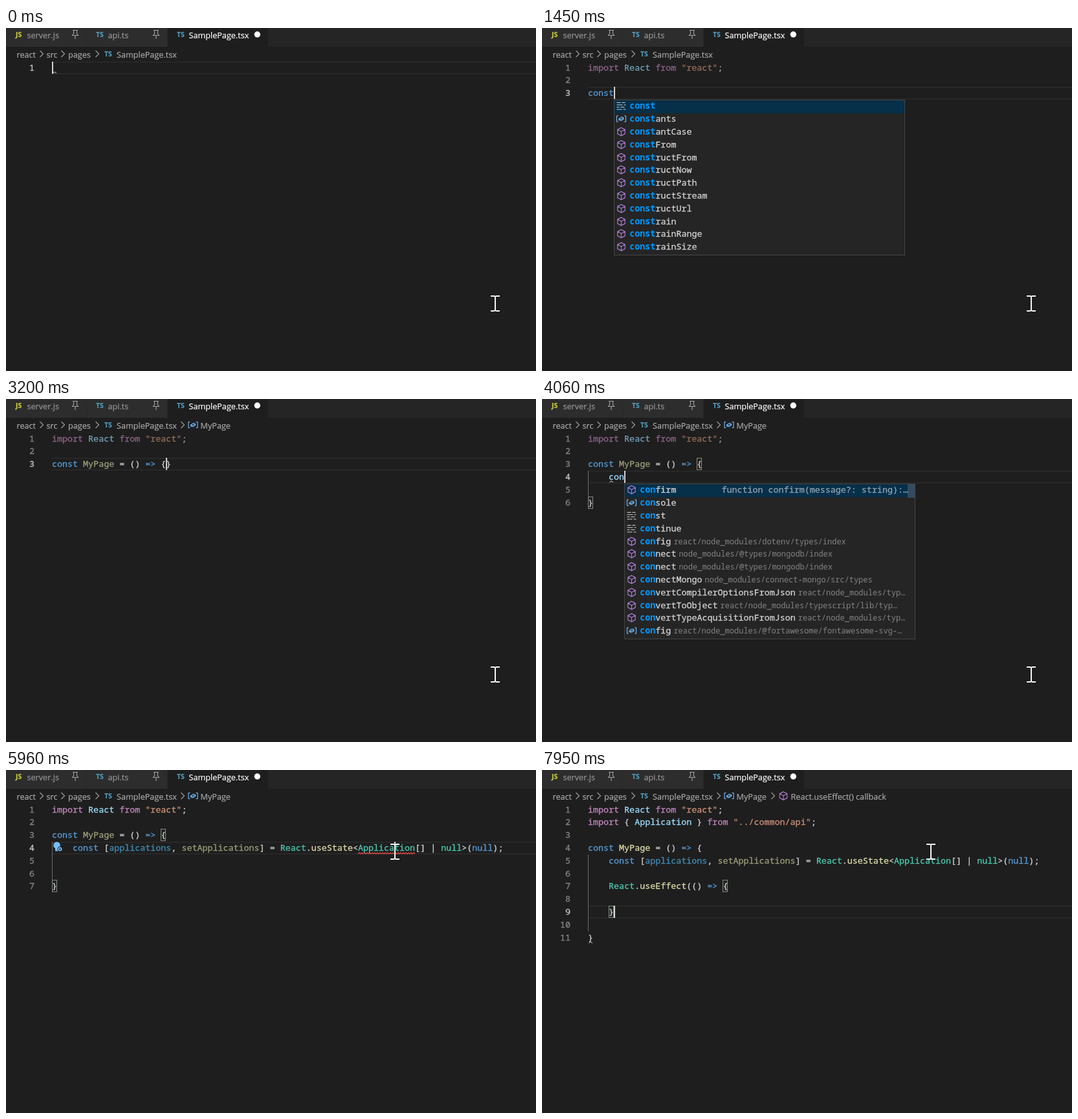
Animation of 819x531 px, one loop 8000 ms. Source, as an HTML page:

```html
<!DOCTYPE html>
<html lang="en">
<head>
<meta charset="utf-8">
<title>Editor typing</title>
<style>
html, body { margin: 0; width: 100%; height: 100%; overflow: hidden; background: #1e1e1e; }
svg { display: block; }
text { white-space: pre; stroke-width: .2; }
.code { font: 13.36px "Noto Sans Mono", "DejaVu Sans Mono", monospace; font-variant-ligatures: none; stroke-width: .3; }
.path { font-size: 12px; stroke-width: .1; }
.hit { font-weight: 700; stroke-width: 0; }
.ui { font: 12.65px "Open Sans", "Noto Sans", sans-serif; }
.lang { font: 700 10.5px "Open Sans", "Noto Sans", sans-serif; }
.line { fill: none; stroke-width: 1.1; }
</style>
</head>
<body>
<svg id="stage" width="819" height="531" viewBox="0 0 819 531">
  <g id="frame"></g>
  <g id="editor"></g>
  <path id="mouse" class="line" stroke="#f4f4f4" style="stroke-width:2"
    d="M-7-11.5h5.5l1.5 1 1.5-1H7M0-11V11M-7 11.5h5.5l1.5-1 1.5 1H7"/>
</svg>
<script>
const LOOP = 8000, X = 71, CW = 8.016, TOP = 52, LH = 19.8;
const $ = id => document.getElementById(id);
const colX = c => X + c * CW;
const rowY = r => Math.floor(TOP + r * LH);
const esc = s => s.replace(/&/g, '&amp;').replace(/</g, '&lt;');

// ---- drawing helpers ----
const text = (x, y, s, fill, cls = 'code', more = '') =>
  `<text class="${cls}" x="${x.toFixed(2)}" y="${y}" fill="${fill}" stroke="${fill}" ${more}>${esc(s)}</text>`;
const rect = (x, y, w, h, fill, more = '') =>
  `<rect x="${x}" y="${y}" width="${w}" height="${h}" fill="${fill}" ${more}/>`;
const path = (x, y, d, stroke) =>
  `<path class="line" transform="translate(${x} ${y})" stroke="${stroke}" d="${d}"/>`;

const ICONS = {
  m: ['#b180d7', 'M0-6.3L5.7-3.3V3.3L0 6.3-5.7 3.3V-3.3ZM-5.7-3.3L0-.3 5.7-3.3M0-.3V6.3'],
  v: ['#75beff', 'M-4.5-4.5H-7v9h2.5M4.5-4.5H7v9H4.5M-3.5 .2L.5-2.6 3.5-1.4V.6L-.5 3-3.5 1.8ZM-3.5 .2L-.5 1.2 3.5-1.4'],
  c: ['#ee9d28', 'M-6.5-2.5l3.5-3.5 2.5 2.5L-4 0ZM-2.5-1H3M0-1V4.5H3M3-1l1.8-1.8L6.6-1 4.8 .8ZM3 4.5l1.8-1.8 1.8 1.8-1.8 1.8Z'],
  k: ['#d4d4d4', 'M-7-5h6M1-5h5M-7-1.5h9M4-1.5h3M-7 2h4M-1 2h6M-7 5.5h8M3 5.5h4'],
  d: ['#d4d4d4', 'M-5-6.5H5V6.5H-5ZM-5-3.5h4M-5-.3h4M-5 3h4'],
  s: ['#d4d4d4', 'M-6.5 6V-6H6.5V6M-6.5 6h2M-3 6h2M.5 6h2M4 6h2']
};
const icon = (k, x, y) => path(x, y, ICONS[k][1], ICONS[k][0]);
const chevron = x => path(x, 40, 'M-2.5-5l5 5-5 5', '#a0a0a0');

// ---- suggestion lists: kind, label, optional path ----
const parse = s => s.trim().split('\n').map(l => {
  const [kind, label, where] = l.trim().split('|');
  return { kind, label, where };
});
const group = (kind, words) => words.split(' ').map(label => ({ kind, label }));
const NM = 'react/node_modules/';
const LISTS = {
  i: [...group('k', 'if import implements in infer instanceof interface is'),
    ...group('v', 'indexedDB innerHeight innerWidth'), ...group('m', 'isFinite isNaN')],
  imp: parse(`d|import React from "react";
    d|import React from 'react';
    d|import React, { useContext } from "react";
    d|import ReactDOM from 'react-dom';`),
  con: parse(`m|confirm
    v|console
    k|const
    k|continue
    m|config|${NM}dotenv/types/index
    m|connect|node_modules/@types/mongodb/index
    m|connect|node_modules/@types/mongodb/index
    m|connectMongo|node_modules/connect-mongo/src/types
    m|convertCompilerOptionsFromJson|${NM}typ…
    m|convertToObject|${NM}typescript/lib/typ…
    m|convertTypeAcquisitionFromJson|${NM}typ…
    v|config|${NM}@fortawesome/fontawesome-svg-…`),
  const: [...group('k', 'const'), ...group('v', 'constants'),
    ...group('m', 'constantCase constFrom constructFrom constructNow constructPath constructStream constructUrl constrain constrainRange constrainSize')],
  eq: parse('s|foreach =>'),
  M: group('v', 'Map Math MediaError MediaList MediaSource MediaStream MessageChannel MessageEvent MessagePort MimeType MouseEvent MutationObserver'),
  R: group('v', 'React ReactDOM Readonly ReadableStream Range RangeError Record Reflect RegExp Request Response ReturnType'),
  dot: [{ kind: 'd', label: 'React.useEffect(() => {' },
    ...group('v', 'Children'), ...group('c', 'Component'), ...group('v', 'Fragment Profiler'),
    ...group('c', 'PureComponent'), ...group('v', 'StrictMode Suspense'),
    ...group('m', 'cloneElement createContext createElement createFactory createRef forwardRef isValidElement lazy memo useCallback useContext useDebugValue useEffect useImperativeHandle useLayoutEffect useMemo useReducer useRef useState'),
    ...group('v', 'version')]
};
const DETAIL = {
  confirm: ['function confirm(message?: string):…', 11],
  'foreach =>': ['For-Each Loop using =>', 12]
};

// ---- edits over time ----
const insert = (s, str, pop = null, move = str.length) => {
  const l = s.lines[s.row];
  s.lines[s.row] = l.slice(0, s.col) + str + l.slice(s.col);
  s.col += move;
  s.pop = pop;
};
const goto = (s, row, col = s.lines[row].length) => Object.assign(s, { row, col });
const setLine = (s, str) => { s.lines[s.row] = str; s.col = str.length; s.pop = null; };
const enter = s => {
  const l = s.lines[s.row], rest = l.slice(s.col);
  const indent = s.row > 1 ? '    ' : '';
  s.lines[s.row] = l.slice(0, s.col);
  s.lines.splice(s.row + 1, 0, ...(rest === '}' ? [indent, rest] : [indent + rest]));
  goto(s, s.row + 1, indent.length);
};
const keys = (t, str, pop) => [...str].map((c, i) => [t + i * 80, s => insert(s, c, pop)]);
const set = (t, props) => [t, s => Object.assign(s, props)];

const STEPS = [
  ...keys(70, 'import', 'i'), ...keys(550, ' Re', 'imp'),
  [810, s => { setLine(s, 'import React from "react";'); s.hint = null; }],
  [880, enter], [960, enter], set(1040, { dim: true }),
  ...keys(1120, 'con', 'con'), ...keys(1360, 'st', 'const'),
  ...keys(1520, ' '), ...keys(1600, 'M', 'M'), set(1680, { pop: null }),
  ...keys(1760, 'yPage '), ...keys(2260, '=', 'eq'), ...keys(2340, ' '),
  [2420, s => insert(s, '()', null, 1)], [2480, s => s.col++], ...keys(2560, ' '),
  ...keys(2640, '=>', 'eq'), ...keys(2880, ' '),
  [2960, s => insert(s, '{}', null, 1)], set(3120, { fn: true, crumb: 1 }),
  [3510, s => { enter(s); s.match = 'MyPage'; }],
  [3590, enter], [3670, s => goto(s, 3)],
  set(3900, { hint: [3, 4] }), ...keys(3900, 'con', 'con'), ...keys(4160, 'st', 'const'),
  [4320, s => { insert(s, ' '); s.hint = null; }],
  [4480, s => insert(s, '[applications, setApplications] = React.useState<Application[] | null>(null);')],
  set(4640, { dim: false }), set(4960, { error: true }),
  [5130, enter], [5720, s => goto(s, 3, 66)], set(5880, { bulb: true }),
  [6120, s => {
    s.lines.splice(1, 0, 'import { Application } from "../common/api";');
    s.row++;
    s.error = s.bulb = false;
  }],
  [6360, s => goto(s, 5)], [6440, enter],
  ...keys(6750, 'React', 'R'), ...keys(7150, '.use', 'dot'),
  [7470, s => { setLine(s, '    React.useEffect(() => {'); s.match = 'useEffect'; }],
  [7630, enter], [7710, enter], [7790, s => setLine(s, '    }')],
  set(7870, { crumb: 2, live: true }), set(7950, { hint: [10, 0] })
];
const start = () => ({ lines: [''], row: 0, col: 0, pop: null, hint: 'caret', crumb: 0 });

// ---- syntax colours ----
const KEY = { import: '#c586c0', from: '#c586c0', const: '#569cd6', '=>': '#569cd6',
  useState: '#dcdcaa', useEffect: '#dcdcaa' };
function style(tok, line, next, s) {
  const imported = line.startsWith('import');
  if (tok[0] === '"') return ['#ce9178'];
  if (tok === 'MyPage') return s.fn ? ['#dcdcaa', s.live ? 1 : .67] : ['#4fc1ff'];
  if (tok === 'applications') return ['#4fc1ff', .67];
  if (tok === 'setApplications') return ['#dcdcaa', .67];
  if (tok === 'React' && next === '.' || tok === 'Application' && !imported) return ['#4ec9b0'];
  if (tok === 'null') return [next === '>' ? '#4ec9b0' : '#569cd6'];
  return [KEY[tok] || (/\w/.test(tok) ? '#9cdcfe' : '#d4d4d4')];
}
function codeLine(line, r, s) {
  return [...line.matchAll(/"[^"]*"|[A-Za-z]+|=>|[^\s]/g)].map(m => {
    const [fill, alpha = 1] = style(m[0], line, line[m.index + m[0].length], s);
    const a = r === 0 && s.dim ? .67 : alpha;
    return text(colX(m.index), rowY(r) + 14, m[0], fill, 'code', `opacity="${a}"`);
  }).join('');
}

function popup(s) {
  const before = s.lines[s.row].slice(0, s.col).trim();
  const word = before.match(/\w*$/)[0];
  const hitLen = l => l.startsWith(before) ? before.length : l.startsWith(word) ? word.length : 0;
  const items = LISTS[s.pop].filter(i => !word || hitLen(i.label));
  const n = Math.min(12, items.length);
  if (!n) return '';
  const x = Math.floor(colX(s.col)), y = rowY(s.row + 1);
  const h = Math.round(n * LH + 3.6);
  let out = rect(0, 0, 450, h, '#252526') + rect(1, 1, 448, Math.min(20, h - 2), '#062f4a');
  items.slice(0, 13).forEach(({ kind, label, where }, i) => {
    const base = Math.round(14.3 + i * LH), len = hitLen(label);
    out += icon(kind, 11.5, base - 4.5);
    out += text(24.3, base, label.slice(0, len), '#0097fb', 'code hit');
    out += text(24.3 + len * CW, base, label.slice(len), '#d4d4d4');
    if (where) out += text(28.3 + label.length * CW, base, where, '#7d7d7d', 'code path');
    if (i === 0 && DETAIL[label]) {
      const [info, gap] = DETAIL[label];
      out += text(450 - gap, base, info, '#93a5b1', 'code', 'text-anchor="end"');
    }
  });
  const long = s.pop === 'con';
  const thumb = long ? 21 : items.length > 12 ? 240 * 12 / items.length : 0;
  if (thumb) out += rect(438, 1, 11, thumb, '#797979', `opacity="${long ? .4 : .22}"`);
  out += rect(.5, .5, 449, h - 1, 'none', 'stroke="#454545"');
  return `<svg x="${x}" y="${y}" width="450" height="${h}">${out}</svg>`;
}

function brackets(s) {
  if (!s.match) return '';
  const open = s.lines.findIndex(l => l.includes(s.match) && l.endsWith('{'));
  const close = s.lines.findIndex((l, i) => i > open && l.trim() === '}');
  return [open, close].map(r => rect(Math.round(colX(s.lines[r].length - 1)) + .5,
    rowY(r) + .5, 7, 18, '#1e261e', 'stroke="#888"')).join('');
}

function draw(s) {
  const y = rowY(s.row);
  let out = rect(X, y, 760, 1.5, '#2b2b2b') + rect(X, y + 18, 760, 1.5, '#2b2b2b');
  out += brackets(s);
  const open = s.lines.findIndex(l => l.includes('MyPage') && l.endsWith('{'));
  if (open >= 0) out += rect(X, rowY(open + 1), 1, (s.lines.length - open - 2) * LH, '#686868');
  s.lines.forEach((l, r) => {
    out += text(44, rowY(r) + 14, `${r + 1}`, r === s.row ? '#c6c6c6' : '#858585', 'code', 'text-anchor="end"');
    out += codeLine(l, r, s);
  });
  if (s.error) out += path(colX(59), rowY(3) + 19, 'M0 0' + 'l2-2 2 2'.repeat(22), '#f14c4c');
  if (s.hint) {
    const [r, c] = s.hint === 'caret' ? [s.row, s.col] : s.hint;
    out += path(colX(c) + 1.5, rowY(r) + 18, 'M0 0l2.5-2 3 2', '#a8a8a8');
  }
  if (s.bulb) out += `<g fill="#75beff"><circle cx="78.5" cy="116.5" r="5.3"/>
    <path d="M76 120h5v5.5h-5z"/><circle cx="83.5" cy="122.5" r="3.6" stroke="#1e1e1e"/></g>
    <circle cx="83.5" cy="122.5" r="1.2" fill="#1e1e1e"/>`;
  out += rect(Math.floor(colX(s.col)), y, 2, 19, '#d2d2d0');
  if (s.crumb) out += chevron(273) + icon('v', 289, 40) + text(300.5, 46, 'MyPage', '#a9a9a9', 'ui');
  if (s.crumb > 1) out += chevron(357) + icon('m', 373, 40) + text(384.5, 46, 'React.useEffect() callback', '#a9a9a9', 'ui');
  if (s.pop) out += popup(s);
  $('editor').innerHTML = out;
}

function drawFrame() {
  const grey = '#969696', soft = '#a9a9a9', blue = '#519aba';
  const pin = x => path(x, 10, 'M-4-6.5h8M-2.5-6.5V-1L-4.5 1.5h9L2.5-1V-6.5M0 1.5V7', '#a0a0a0');
  $('frame').innerHTML = rect(0, 0, 819, 531, '#1e1e1e') + rect(0, 0, 819, 29, '#252526') +
    rect(0, 0, 124, 29, '#2d2d2d') + rect(125, 0, 124, 29, '#2d2d2d') + rect(250, 0, 155, 29, '#1e1e1e') +
    text(15, 14, 'JS', '#cbcb41', 'lang') + text(32.5, 16, 'server.js', grey, 'ui') + pin(107) +
    text(139, 14, 'TS', blue, 'lang') + text(157.5, 16, 'api.ts', grey, 'ui') + pin(232) +
    text(264, 14, 'TS', blue, 'lang') + text(282.5, 16, 'SamplePage.tsx', '#fff', 'ui') +
    '<circle cx="388.3" cy="10" r="4.7" fill="#fff"/>' +
    text(16.5, 46, 'react', soft, 'ui') + chevron(55) + text(62.5, 46, 'src', soft, 'ui') + chevron(88) +
    text(96, 46, 'pages', soft, 'ui') + chevron(141) + text(152, 44, 'TS', blue, 'lang') +
    text(171, 46, 'SamplePage.tsx', soft, 'ui');
}

function moveMouse(t) {
  const p = Math.min(1, Math.max(0, (t - 5210) / 430)), e = p * p * (3 - 2 * p);
  $('mouse').setAttribute('transform', `translate(${756 - 155 * e} ${426.5 - 300 * e})`);
}

let shown = -1;
function tick() {
  const t = performance.now() % LOOP;
  const done = STEPS.filter(([at]) => at <= t);
  if (done.length !== shown) {
    const s = start();
    done.forEach(([, edit]) => edit(s));
    draw(s);
    shown = done.length;
  }
  moveMouse(t);
  requestAnimationFrame(tick);
}
drawFrame();
tick();
</script>
</body>
</html>
```
